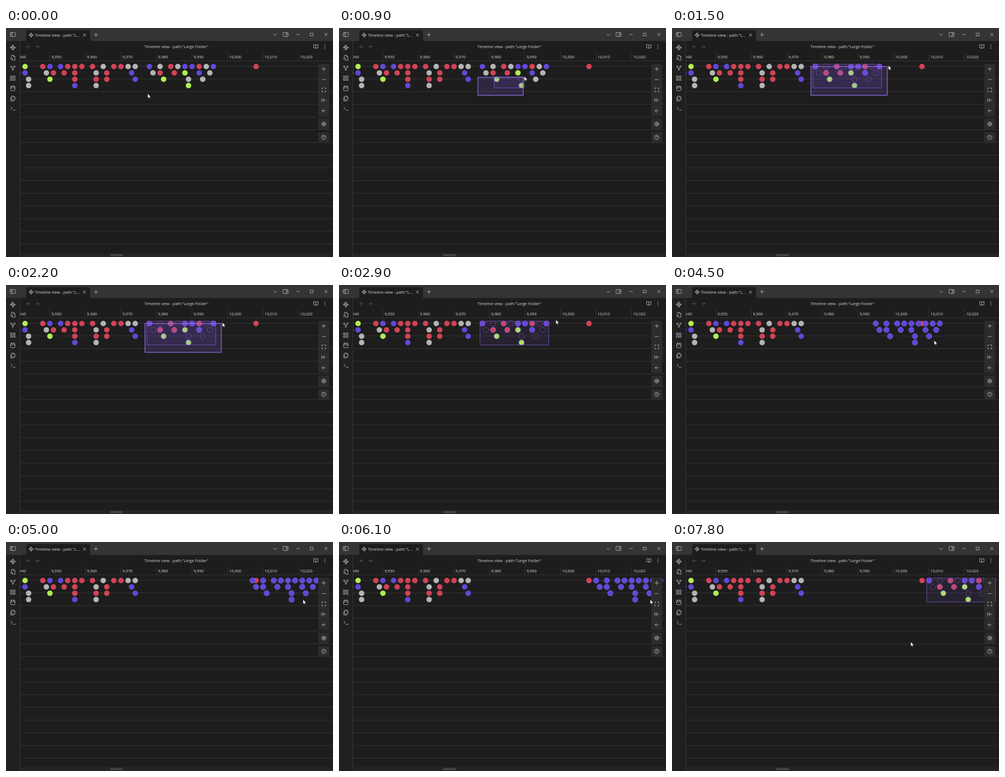
An HTML page for the animation above (8 s loop, 600 by 422 pixels).

```html
<!DOCTYPE html>
<html lang="en">
<head>
<meta charset="utf-8">
<title>Timeline view</title>
<style>
  html, body { margin: 0; width: 100%; height: 100%; overflow: hidden; background: #1e1d1e; }
  svg { display: block; width: 600px; height: 422px; }
  text { font: 7.27px "Open Sans", "Noto Sans", sans-serif; fill: #dadada; }
  .icon { fill: none; stroke: #b3b3b3; stroke-width: .9; stroke-linecap: round; stroke-linejoin: round; }
  .line { stroke: #353435; stroke-width: 1; }
  .dim { stroke: #5c5c5c; }
</style>
</head>
<body>
<svg viewBox="0 0 600 422">
  <defs>
    <g id="nodes">
      <circle cx="0" cy="-2.8" r="1.1"/><circle cx="-2.8" cy="0" r="1.1"/>
      <circle cx="2.8" cy="0" r="1.1"/><circle cx="0" cy="2.8" r="1.1"/>
      <path d="M-.8-2-2-.8M-1.7 0H1.7M.8 2 2 .8"/>
    </g>
    <path id="close" d="M-2.5-2.5 2.5 2.5M2.5-2.5-2.5 2.5"/>
    <path id="plus" d="M-3.3 0H3.3M0-3.3V3.3"/>
    <path id="arrow" d="M3 0H-3M0-3-3 0 0 3"/>
  </defs>

  <rect width="600" height="422" fill="#1e1d1e"/>
  <g id="grid"></g>
  <g id="dots"></g>
  <rect id="bounds" fill="#8a5cf5" fill-opacity=".08" stroke="#6d4ca8"/>
  <rect id="lasso" fill="#8a5cf5" fill-opacity=".15" stroke="#8d6ce0" stroke-width="1.3"/>

  <!-- scrollbar -->
  <rect x="26" y="415" width="574" height="7" fill="#262526"/>
  <rect x="191" y="416.5" width="23.5" height="4" rx="2" fill="#444"/>

  <!-- title bar and ribbon -->
  <rect y="24" width="25" height="398" fill="#212021"/>
  <path class="line" d="M25.5 24V422"/>
  <rect width="600" height="24" fill="#353435"/>
  <path d="M34 24Q37 24 37 21V7Q37 4 40 4H151Q154 4 154 7V21Q154 24 157 24Z" fill="#1e1d1e"/>
  <text x="53" y="16">Timeline view - path:"L...</text>
  <text x="254" y="37.2">Timeline view - path:"Large Folder"</text>

  <g class="icon">
    <g transform="translate(12.5 12)"><rect x="-4.7" y="-3.7" width="9.4" height="7.4" rx="1"/><path d="M-1.2-3.7V3.7M-3.4-1.8H-2.5M-3.4 0H-2.5"/></g>
    <use href="#nodes" x="46" y="13"/>
    <use href="#close" x="144" y="13"/>
    <use href="#plus" x="165" y="12.5"/>
    <path d="M491 11 494 14 497 11"/>
    <g transform="translate(513 12)"><rect x="-4.7" y="-3.7" width="9.4" height="7.4" rx="1"/><path d="M1.2-3.7V3.7M2.6-1.8H3.4M2.6 0H3.4"/></g>
    <path d="M533 12H538.500"/>
    <rect x="558.500" y="9.500" width="5" height="5"/>
    <use href="#close" x="587" y="12"/>
    <use class="dim" href="#arrow" x="41" y="34.500"/>
    <use class="dim" href="#arrow" transform="translate(57.500 34.500) scale(-1 1)"/>
    <path d="M568.500 31.500V37.500M568.500 31.500Q567 30.500 564.500 30.500V36.500Q567 36.500 568.500 37.500 570 36.500 572.500 36.500V30.500Q570 30.500 568.500 31.500"/>
    <path d="M585 31.300V31.400M585 34.300V34.400M585 37.300V37.400" stroke-width="1.5"/>

    <use href="#nodes" transform="translate(12.500 36) scale(1.150)"/>
    <g transform="translate(12.500 55)"><path d="M-2.500-1.500V-4.500H1.500L4 -2V4.500H0M1.500-4.500V-2H4"/><circle cx="-2.300" cy="1.500" r="1.700"/><path d="M-1 3 .3 4.300"/></g>
    <g transform="translate(12.500 73.500)"><circle cx="-3" cy="-2.500" r="1.300"/><circle cx="3" cy="-2.500" r="1.300"/><circle cx="0" cy="3.200" r="1.300"/><path d="M-3-1.200Q-3 .5 0 .5T3-1.200M0 .5V1.900"/></g>
    <path d="M8.500 88.500h3v3h-3zM13.700 88.500h3v3h-3zM8.500 93.500h3v3h-3zM13.700 93.500h3v3h-3z"/>
    <g transform="translate(12.500 111)"><rect x="-4" y="-3.500" width="8" height="8" rx="1"/><path d="M-4-.8H4M-2-4.700V-2.500M2-4.700V-2.500"/></g>
    <g transform="translate(12.500 130)"><path d="M-1.800-4.500H1.800L4-2.300V2.500H-1.800ZM1.500-4.500V-2H4M-3.800-2.500V4.500H1.800"/></g>
    <path d="M9 145.500 11.700 148 9 150.500M13 151.500H17"/>
  </g>

  <!-- view controls -->
  <g fill="#2d2c2d">
    <rect x="573" y="66" width="20" height="96" rx="2"/>
    <rect x="573" y="167" width="20" height="20" rx="2"/>
    <rect x="573" y="192" width="20" height="19" rx="2"/>
  </g>
  <g class="icon">
    <use href="#plus" x="583" y="75.500"/>
    <path d="M579.700 95H586.300"/>
    <path d="M579.500 112.500V110.500H581.500M584.500 110.500H586.500V112.500M586.500 115.500V117.500H584.500M581.500 117.500H579.500V115.500"/>
    <use href="#arrow" x="584" y="133"/><path d="M579.300 130V136"/>
    <use href="#arrow" x="583" y="152.500"/>
    <circle cx="583" cy="177" r="1.300"/>
    <circle cx="583" cy="177" r="3.300"/>
    <circle cx="583" cy="177" r="3.900" stroke-dasharray="1.200 1.860" stroke-linecap="butt"/>
    <circle cx="583" cy="201.500" r="4"/>
    <path d="M581.800 200.400Q582 199.300 583.100 199.300 584.300 199.400 584.300 200.500 584.200 201.300 583 202M583 203.700V203.800"/>
  </g>

  <path id="cursor" d="M0 0V8.200L1.900 6.500 3.100 9.200 4.400 8.600 3.200 6H5.700Z" fill="#fff" stroke="#111" stroke-width=".5"/>
</svg>

<script>
const LOOP = 8000, UNIT = 6.52, RADIUS = 5;
const LASSO_START = 300, LASSO_END = 2300, DRAG_START = 3300, DRAG_END = 6700;
const COLORS = { r: '#d14355', p: '#6248d9', g: '#b5b4b5', l: '#aeee52' };
const ANCHOR = { x: 255, y: 124 };

// Each entry is an offset from 9,900 and a color key; one string per row.
const FIXED = [
  '43l 48r 50p 53p 55r 57r 59r 62r 65g 68r 70r 72g 74g 108r',
  '41p 43p 49g 51r 54r 57r 63g 66r 73p',
  '44g 50l 57r 63r 66r 74p',
  '44g 57p 63g'
];
const MOVABLE = [
  '78p 81g 84r 86g 88p 90p 92r 94g 96p',
  '79g 81r 85r 88l 92p 95g',
  '82l 89g 93g',
  '89l'
];

// Keyframes: time, then values.
const CURSOR = [
  [0, 260, 121], [99, 260, 121], [100, 257, 122], [200, 257, 122], [300, 257, 122],
  [700, 306, 101], [1100, 374, 77], [1500, 397, 69], [2200, 397, 69], [2600, 398, 64],
  [2900, 398, 64], [3200, 363, 99], [3500, 402, 100], [3600, 402, 100], [4500, 481, 102],
  [5000, 545, 106], [5300, 570, 106], [5900, 570, 106], [6100, 571, 106], [6700, 571, 106],
  [7400, 438, 181], [7500, 438, 182], [7800, 438, 184]
];
const SHIFT = [[3200, 0], [3500, 6], [3600, 6], [4500, 17], [5000, 29], [5300, 32]];

const $ = id => document.getElementById(id);
const toX = offset => 80.6 + (offset - 50) * UNIT;

function add(parent, tag, attrs) {
  const node = document.createElementNS('http://www.w3.org/2000/svg', tag);
  set(node, attrs);
  return parent.appendChild(node);
}
function set(node, attrs) {
  for (const key in attrs) node.setAttribute(key, attrs[key]);
}
function sample(track, t) {
  const next = track.findIndex(key => key[0] > t);
  if (next === 0) return track[0].slice(1);
  if (next < 0) return track[track.length - 1].slice(1);
  const a = track[next - 1], b = track[next];
  const k = (t - a[0]) / (b[0] - a[0]);
  return a.slice(1).map((v, i) => v + (b[i + 1] - v) * k);
}
function makeDots(rows) {
  return rows.flatMap((row, r) => row.split(' ').map(item => {
    const x = toX(parseInt(item)), y = 71 + r * 11.7, key = item.slice(-1);
    const node = add($('dots'), 'circle', { cx: x, cy: y, r: RADIUS, fill: COLORS[key] });
    return { x, y, key, node };
  }));
}
function setBox(node, box) {
  node.style.display = box ? '' : 'none';
  if (box) set(node, { x: box[0], y: box[1], width: box[2] - box[0], height: box[3] - box[1] });
}

for (let row = 0; row < 15; row++) {
  const y = 70.4 + row * 23.43;
  add($('grid'), 'path', { class: 'line', d: `M26 ${y}H600` });
}
add($('grid'), 'path', { class: 'line', d: 'M26 60.5H600' });
for (let i = 0; i < 9; i++) {
  const x = 15.2 + i * UNIT * 10;
  add($('grid'), 'path', { class: 'line', d: `M${x} 44V60` });
  add($('grid'), 'text', { x: x + 3, y: 56 }).textContent = (9940 + i * 10).toLocaleString('en-US');
}
makeDots(FIXED);
const movable = makeDots(MOVABLE);

function draw(t) {
  const [cx, cy] = sample(CURSOR, t);
  const shift = Math.round(sample(SHIFT, t)[0]) * UNIT;
  const lassoing = t >= LASSO_START && t < LASSO_END;
  const dragging = t >= DRAG_START && t < DRAG_END;
  const corner = { x: cx - 2, y: cy + 2 };
  const inLasso = d => d.x - RADIUS < corner.x && d.y + RADIUS > corner.y;
  const selected = movable.filter(d => t >= LASSO_END || (lassoing && inLasso(d)));

  for (const d of movable) {
    const on = selected.includes(d);
    const hollow = on && !dragging && d.key === 'g';
    set(d.node, {
      cx: d.x + shift,
      fill: hollow ? 'none' : dragging ? COLORS.p : COLORS[d.key],
      stroke: !on ? 'none' : dragging ? '#7059dc' : hollow ? '#594580' : '#7656c4',
      'stroke-width': .9
    });
  }

  const xs = selected.map(d => d.x + shift), ys = selected.map(d => d.y);
  setBox($('bounds'), selected.length && !dragging && [
    Math.min(...xs) - 4.4, Math.min(...ys) - 4.2, Math.max(...xs) + 4.2, Math.max(...ys) + 4.4
  ]);
  setBox($('lasso'), lassoing && [ANCHOR.x, corner.y, Math.max(corner.x, ANCHOR.x), ANCHOR.y]);
  $('cursor').setAttribute('transform', `translate(${cx} ${cy})`);
}

const start = performance.now();
function tick() {
  const t = (performance.now() - start) % LOOP;
  draw(Math.floor(t / 100) * 100);
  requestAnimationFrame(tick);
}
tick();
</script>
</body>
</html>
```
